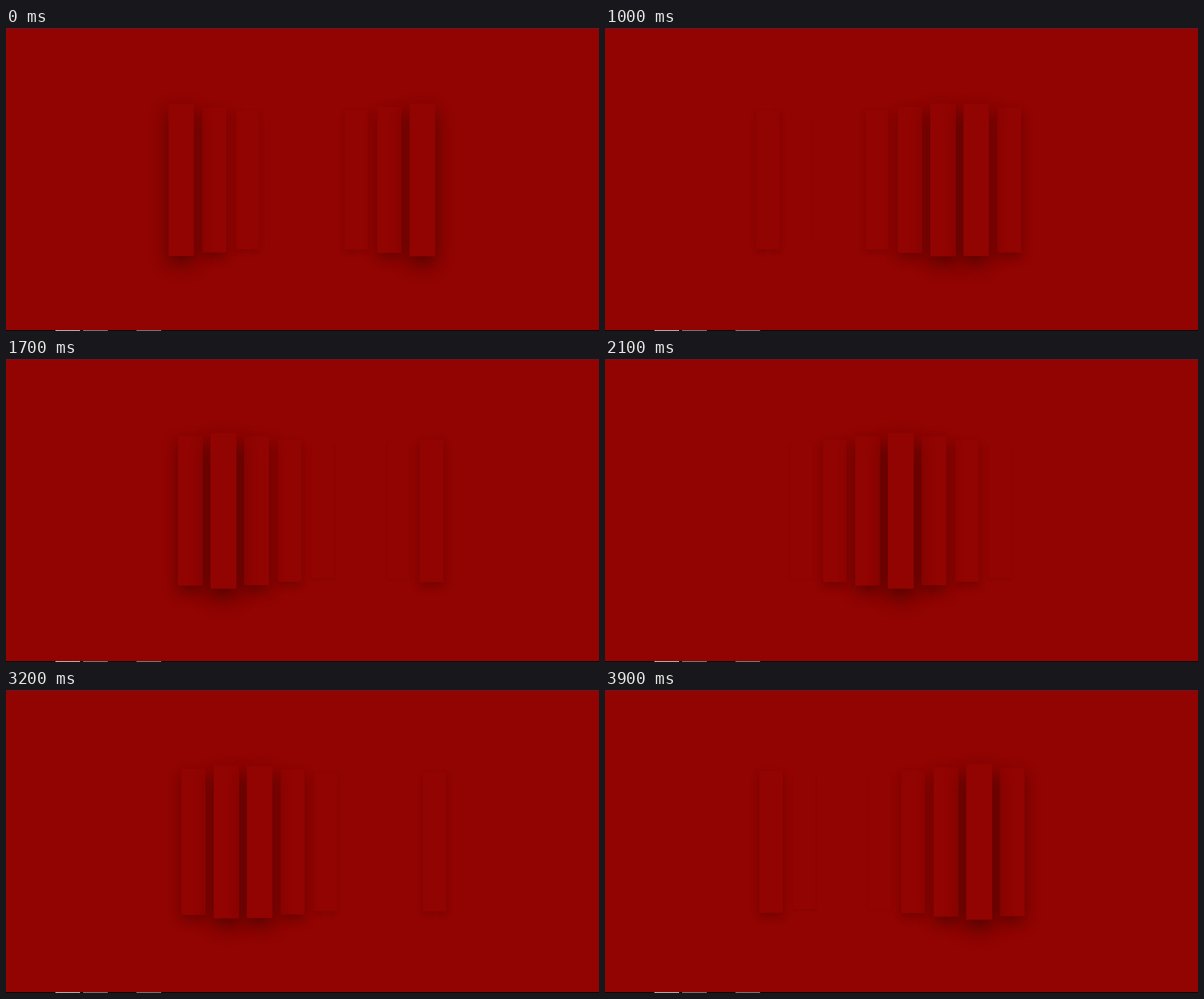
These frames come from a looping animation (600 px wide and 307 px high, 4000 ms). An HTML page with a canvas:

```html
<!DOCTYPE html>
<html lang="en">
<head>
<meta charset="utf-8">
<title>Rising bars</title>
<style>
  html, body { margin: 0; width: 100%; height: 100%; overflow: hidden; background: #910402; }
  canvas { display: block; }
</style>
</head>
<body>
<canvas id="stage" width="600" height="307"></canvas>
<script>
const ctx = document.getElementById('stage').getContext('2d');

const RED = '#910402';
const LOOP = 4000, STEP = 100;
const BARS = 7, CYCLE = 1400, DELAY = CYCLE / BARS, FIRST_PEAK = 100;
const CENTER_X = 299.3, CENTER_Y = 153.9;
const SPACING = 39.64, DRIFT = 43.3;
const WIDTH = 26.5, HEIGHT = 158;

// Signed phase in [-0.5, 0.5): zero when the bar is fully raised.
const wrap = v => v - Math.floor(v + 0.5);

function barAt(index, time) {
  const phase = wrap((time - FIRST_PEAK - DELAY * index) / CYCLE);
  const lift = 1 - 2 * Math.abs(wrap(phase - 0.008));
  return {
    x: CENTER_X + (index - 3) * SPACING + DRIFT * phase,
    lift,
    scale: 0.848 + 0.152 * lift,
    depth: lift + index * 0.04 // near ties go to the later bar
  };
}

function drawBar({ x, lift, scale }) {
  const w = WIDTH * scale, h = HEIGHT * scale;
  ctx.save();
  ctx.shadowColor = `rgba(0, 0, 0, ${0.5 * lift})`;
  ctx.shadowBlur = 21 * lift;
  ctx.shadowOffsetY = 9 * lift;
  ctx.fillStyle = RED;
  ctx.fillRect(x - w / 2, CENTER_Y - h / 2, w, h);
  ctx.restore();
}

function rect(color, x, y, w, h) {
  ctx.fillStyle = color;
  ctx.fillRect(x, y, w, h);
}

function drawEdges() {
  rect('#6a1626', 0, 0, 600, 1);
  rect('#150000', 0, 306, 600, 1);
  rect('#b0a8a4', 50, 306, 25, 1);
  rect('#7a706c', 78, 306, 25, 1);
  rect('#7a706c', 132, 306, 25, 1);
}

function draw(time) {
  rect(RED, 0, 0, 600, 307);
  Array.from({ length: BARS }, (_, i) => barAt(i, time))
    .sort((a, b) => a.depth - b.depth)
    .forEach(drawBar);
  drawEdges();
}

let start;
function tick(now) {
  start ??= now;
  const time = (now - start) % LOOP;
  draw(Math.floor(time / STEP) * STEP);
  requestAnimationFrame(tick);
}
draw(0);
requestAnimationFrame(tick);
</script>
</body>
</html>
```
